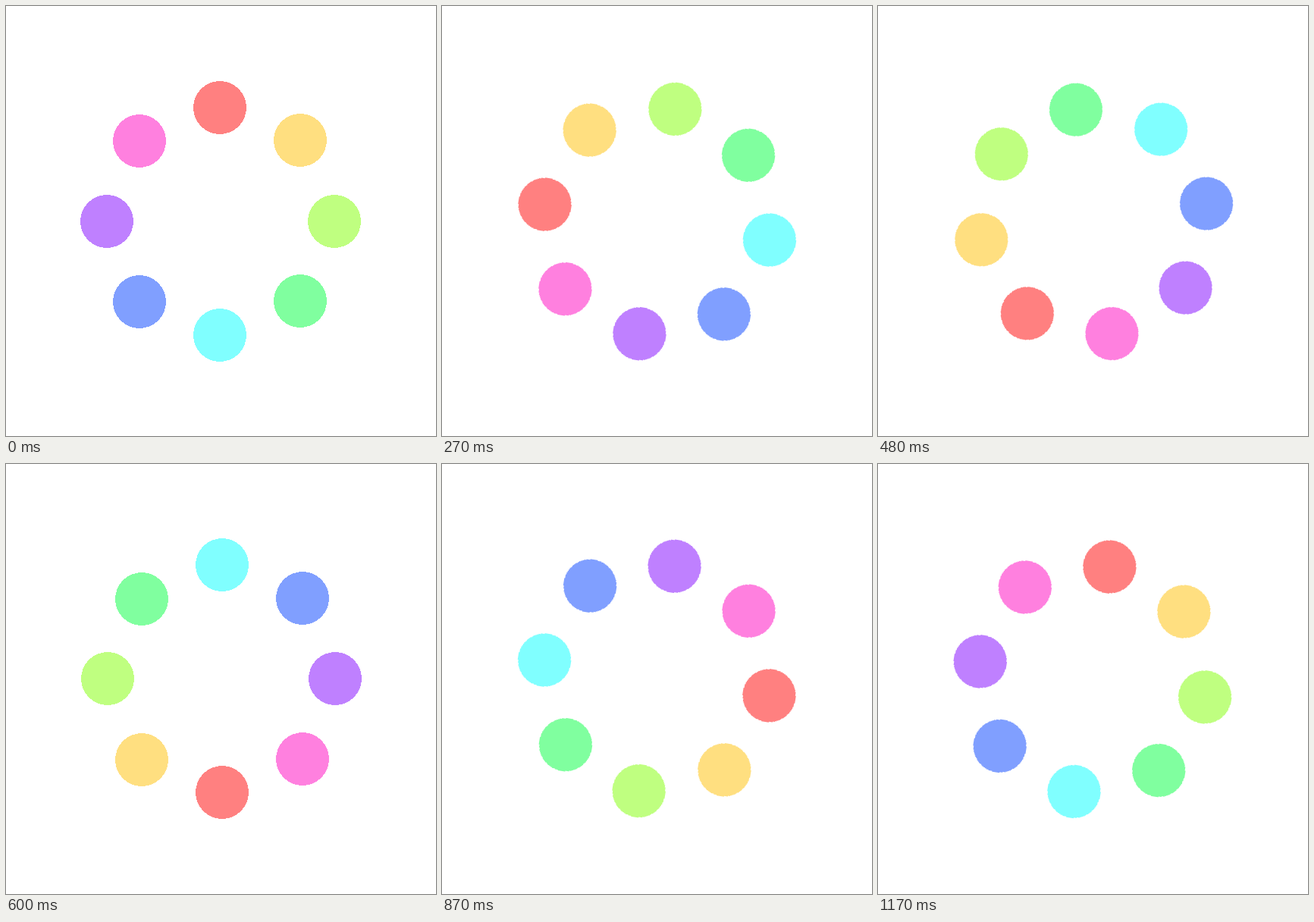
Write an HTML page that moves like this. It is 567 px wide and 567 px high and loops after 1.2 s.

```html
<!DOCTYPE html>
<html lang="en">
<head>
<meta charset="utf-8">
<title>Rainbow ring</title>
<style>
  html, body {
    margin: 0;
    width: 100%;
    height: 100%;
    overflow: hidden;
    background: #fff;
  }
  svg {
    display: block;
    width: 567px;
    height: 567px;
  }
  .ring {
    transform-origin: 283.5px 283.5px;
    animation: spin 1.2s steps(40) infinite;
  }
  @keyframes spin {
    to { transform: rotate(-360deg); }
  }
</style>
</head>
<body>
<svg viewBox="0 0 567 567" shape-rendering="crispEdges">
  <g class="ring">
    <circle cx="282" cy="134" r="35" fill="hsl(0 100% 75%)"/>
    <circle cx="388" cy="177" r="35" fill="hsl(45 100% 75%)"/>
    <circle cx="433" cy="284" r="35" fill="hsl(90 100% 75%)"/>
    <circle cx="388" cy="389" r="35" fill="hsl(135 100% 75%)"/>
    <circle cx="282" cy="434" r="35" fill="hsl(180 100% 75%)"/>
    <circle cx="176" cy="390" r="35" fill="hsl(225 100% 75%)"/>
    <circle cx="133" cy="284" r="35" fill="hsl(270 100% 75%)"/>
    <circle cx="176" cy="178" r="35" fill="hsl(315 100% 75%)"/>
  </g>
</svg>
</body>
</html>
```
